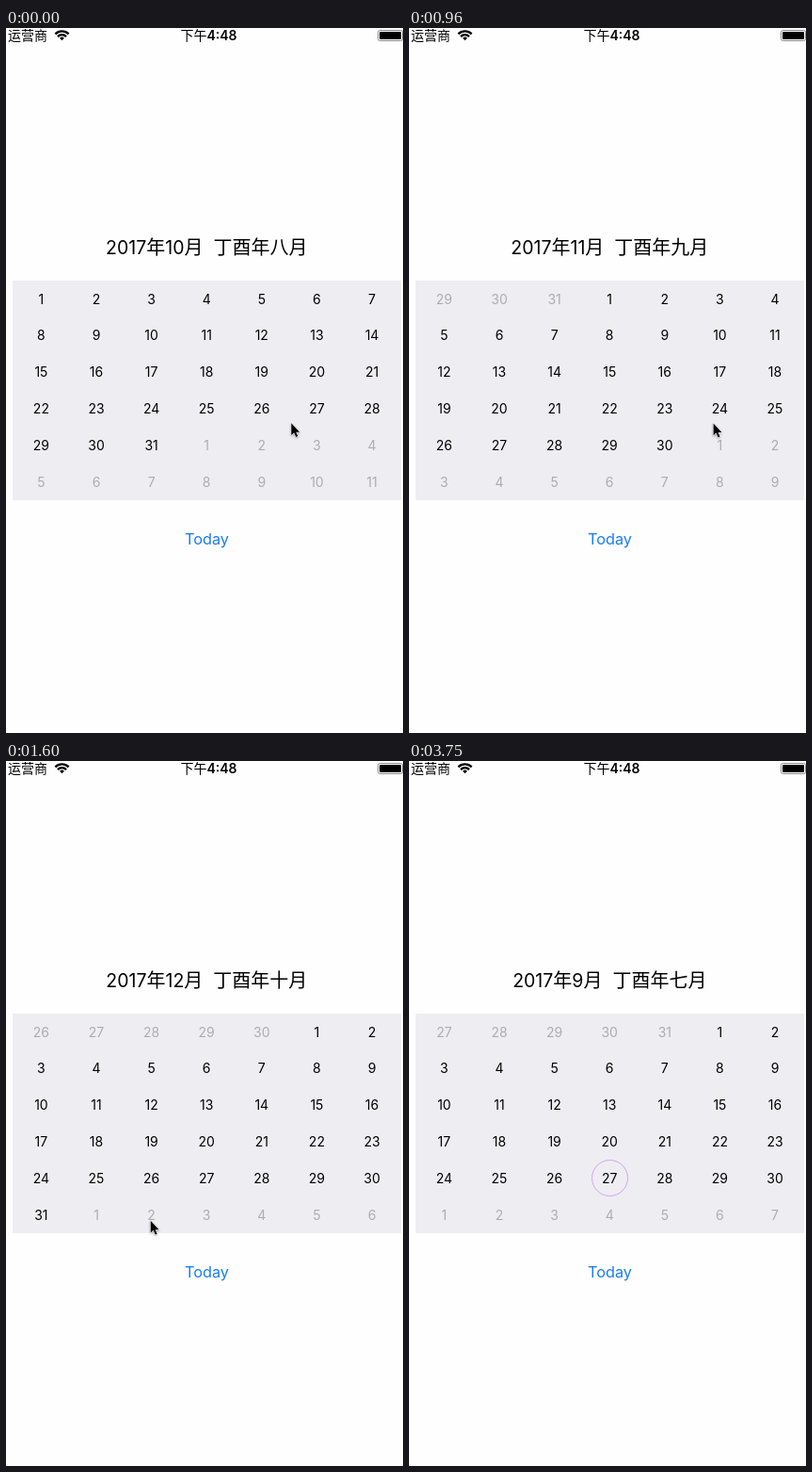
An HTML page that plays this animation: 422 px wide and 748 px high, repeating every 4.32 s.

```html
<!DOCTYPE html>
<html lang="zh-CN">
<head>
<meta charset="utf-8">
<title>Calendar</title>
<style>
  html, body { margin: 0; width: 100%; height: 100%; overflow: hidden; background: #fefefe; }
  svg { display: block; width: 422px; height: 748px; font-family: Inter, "Noto Sans CJK SC", sans-serif; }
  .cjk { font-family: "Noto Sans CJK SC", "Noto Sans CJK", sans-serif; }
  #title { font-size: 19.5px; white-space: pre; }
  #title .cjk { font-size: 20px; font-weight: 300; }
  #pages { font-size: 14px; }
  text.mid, #pages text { text-anchor: middle; }
  .dim { fill: #adadb0; }
  #cursor { filter: drop-shadow(0 1px 1px rgba(0, 0, 0, .35)); }
</style>
</head>
<body>
<svg viewBox="0 0 422 748">
  <clipPath id="panel"><rect x="7" y="268" width="413" height="233"/></clipPath>

  <text class="cjk" x="2" y="13" font-size="14">运营商</text>
  <g fill="none" stroke="#000" stroke-width="2.3">
    <path d="M52.4 6.4a10 10 0 0 1 14.2 0M55 9.1a6.3 6.3 0 0 1 9 0"/>
    <path d="M59.5 13.2l-2.4-2.4a3.4 3.4 0 0 1 4.8 0z" fill="#000" stroke="none"/>
  </g>
  <text class="mid" x="215.5" y="13" font-size="14" font-weight="600"><tspan class="cjk" font-weight="500">下午</tspan>4:48</text>
  <rect x="395.5" y="2.5" width="26" height="11" rx="2" fill="none" stroke="#8a8a8a"/>
  <rect x="397" y="4" width="23" height="8" rx="1"/>

  <text id="title" class="mid" x="213.3" y="239.5"></text>
  <rect x="7" y="268" width="413" height="233" fill="#eeedf2"/>
  <g clip-path="url(#panel)"><g id="pages"></g></g>
  <text id="today" class="mid" x="213.5" y="548" font-size="16.3" fill="#1a7df0">Today</text>
  <path id="cursor" d="M.3 1.3v12.7l2.9-2.7 2.1 4.6 1.9-.8-2-4.4h3.9z" stroke="#fff" paint-order="stroke"/>
</svg>
<script>
const LOOP = 4320, PAGE = 414, RESET = 2910;
const byId = id => document.getElementById(id);

const linear = s => s;
const easeIn = s => s * s;
const easeOut = s => 1 - (1 - s) ** 3;
const easeInOut = s => s * s * (3 - 2 * s);

// Each key: [time, values, easing used to arrive there]
const scrollKeys = [
  [20, [0]],
  [250, [155], easeIn], [603, [PAGE], easeOut],
  [1010, [PAGE]],
  [1262, [PAGE + 165], easeIn], [1590, [2 * PAGE], easeOut]
];
const cursorKeys = [
  [20, [303, 418]], [275, [137.5, 418], easeInOut],
  [560, [137.5, 418]], [900, [323.3, 418.3], easeInOut],
  [1010, [323.3, 418.3]], [1285, [146, 420], easeInOut],
  [1400, [146, 421]], [1615, [154.5, 496], easeIn],
  [2100, [211.5, 567], easeOut], [2170, [212, 564], easeInOut],
  [2600, [215, 543], easeInOut],
  [3420, [215, 543]], [3750, [364, 750], easeIn]
];
const fadeKeys = [
  [2790, [1]], [2870, [.2], easeOut],
  [2940, [.2]], [3220, [1], easeInOut]
];

function track(keys, t) {
  const i = keys.findIndex(key => key[0] > t);
  if (i === 0) return keys[0][1];
  if (i < 0) return keys[keys.length - 1][1];
  const [t0, from] = keys[i - 1], [t1, to, ease = linear] = keys[i];
  const s = ease((t - t0) / (t1 - t0));
  return from.map((v, k) => v + (to[k] - v) * s);
}

function monthPage(month) {
  const left = (month - 10) * PAGE;
  const firstDay = new Date(2017, month - 1, 1).getDay();
  let page = "";
  for (let i = 0; i < 42; i++) {
    const date = new Date(2017, month - 1, 1 - firstDay + i);
    const x = left + 37.4 + i % 7 * 58.6;
    const baseline = Math.round(292.6 + Math.floor(i / 7) * 38.8);
    const inMonth = date.getMonth() === month - 1;
    if (month === 9 && inMonth && date.getDate() === 27)
      page += `<circle cx="${x + .3}" cy="${baseline - 5.5}" r="19" fill="none" stroke="#cfa6ee"/>`;
    page += `<text x="${x}" y="${baseline}"${inMonth ? "" : ' class="dim"'}>${date.getDate()}</text>`;
  }
  return page;
}

const lunarMonths = { 9: "七", 10: "八", 11: "九", 12: "十" };
const cjk = s => `<tspan class="cjk">${s}</tspan>`;
let shownMonth;

function showTitle(month) {
  if (month === shownMonth) return;
  shownMonth = month;
  byId("title").innerHTML =
    `2017${cjk("年")}${month}${cjk("月")}  ${cjk(`丁酉年${lunarMonths[month]}月`)}`;
}

function draw(now) {
  const t = now % LOOP;
  const scroll = t < RESET ? track(scrollKeys, t)[0] : -PAGE;
  const [x, y] = track(cursorKeys, t);
  showTitle(t < 603 ? 10 : t < 1590 ? 11 : t < RESET ? 12 : 9);
  byId("pages").setAttribute("transform", `translate(${-scroll})`);
  byId("today").setAttribute("opacity", track(fadeKeys, t)[0]);
  byId("cursor").setAttribute("transform", `translate(${x} ${y})`);
  byId("cursor").setAttribute("visibility", t < 3750 ? "visible" : "hidden");
  requestAnimationFrame(draw);
}

byId("pages").innerHTML = [9, 10, 11, 12].map(monthPage).join("");
draw(0);
</script>
</body>
</html>
```
